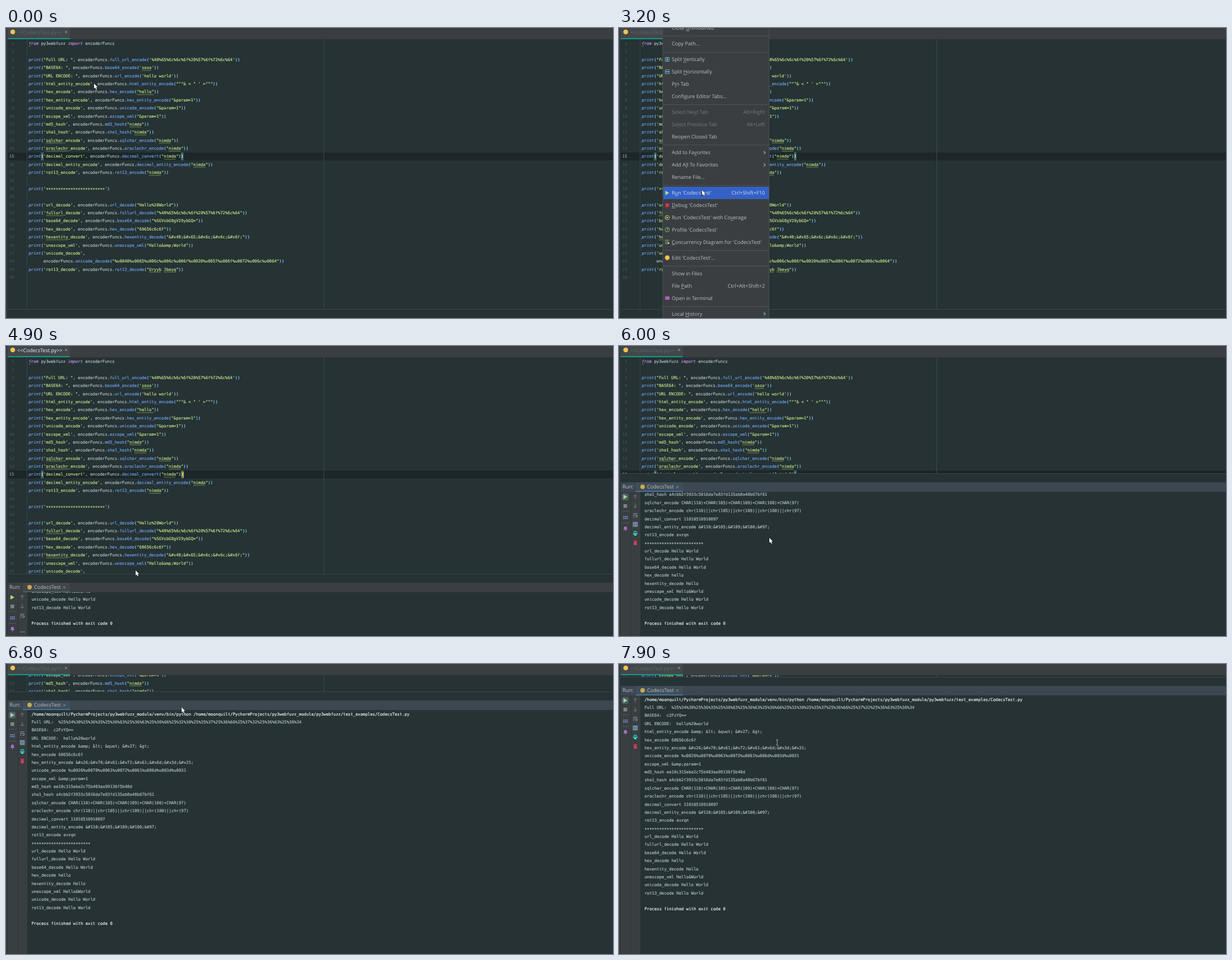
Write an HTML page with a canvas that moves like this. It is 1082x517 px and loops after 8 s.

```html
<!DOCTYPE html>
<html lang="en">
<head>
<meta charset="utf-8">
<title>Codec test run</title>
<style>
html, body { margin: 0; width: 100%; height: 100%; overflow: hidden; background: #263234; }
canvas { display: block; }
</style>
</head>
<body>
<canvas id="stage" width="1082" height="517"></canvas>
<script>
const W = 1082, HT = 517, LOOP = 8000;
const ctx = document.getElementById('stage').getContext('2d');
ctx.textRendering = 'geometricPrecision';

const CW = 4.378, LINE = 14.38, CODE_X = 40.5;
const MONO = '7.27px "DejaVu Sans Mono", monospace';
const UI = '9.1px "Open Sans", "Noto Sans", sans-serif';
const C = {
  bg: '#263234', bar: '#3a3e40', menu: '#3b3e40', rule: '#37474b', logo: '#efc352',
  plain: '#b4c1c8', func: '#6fa4ee', str: '#bfe38a', punct: '#89ddff', key: '#c792ea',
  ui: '#b9c0c4', dim: '#73797c'
};

const CODE = `from py3webfuzz import encoderFuncs

print("Full URL: ", encoderFuncs.full_url_encode('%48%65%6c%6c%6f%20%57%6f%72%6c%64'))
print("BASE64: ", encoderFuncs.base64_encode('sasa'))
print("URL ENCODE: ", encoderFuncs.url_encode('hello world'))
print('html_entity_encode', encoderFuncs.html_entity_encode("""& < " ' >"""))
print('hex_encode', encoderFuncs.hex_encode("hello"))
print('hex_entity_encode', encoderFuncs.hex_entity_encode("&param=1"))
print('unicode_encode', encoderFuncs.unicode_encode("&param=1"))
print('escape_xml', encoderFuncs.escape_xml("&param=1"))
print('md5_hash', encoderFuncs.md5_hash("nimda"))
print('sha1_hash', encoderFuncs.sha1_hash("nimda"))
print('sqlchar_encode', encoderFuncs.sqlchar_encode("nimda"))
print('oraclechr_encode', encoderFuncs.oraclechr_encode("nimda"))
print('decimal_convert', encoderFuncs.decimal_convert("nimda"))
print('decimal_entity_encode', encoderFuncs.decimal_entity_encode("nimda"))
print('rot13_encode', encoderFuncs.rot13_encode("nimda"))

print('************************')

print('url_decode', encoderFuncs.url_decode("Hello%20World"))
print('fullurl_decode', encoderFuncs.fullurl_decode("%48%65%6c%6c%6f%20%57%6f%72%6c%64"))
print('base64_decode', encoderFuncs.base64_decode("%SGVsbG8gV29ybGQ="))
print('hex_decode', encoderFuncs.hex_decode("68656c6c6f"))
print('hexentity_decode', encoderFuncs.hexentity_decode("&#x48;&#x65;&#x6c;&#x6c;&#x6f;"))
print('unescape_xml', encoderFuncs.unescape_xml("Hello&amp;World"))
print('unicode_decode',
      encoderFuncs.unicode_decode("%u0048%u0065%u006c%u006c%u006f%u0020%u0057%u006f%u0072%u006c%u0064"))
print('rot13_decode', encoderFuncs.rot13_decode("Uryyb Jbeyq"))
`.split('\n');

const OUTPUT = `/home/moonquilt/PycharmProjects/py3webfuzz_module/venv/bin/python /home/moonquilt/PycharmProjects/py3webfuzz_module/py3webfuzz/test_examples/CodecsTest.py
Full URL:  %25%34%38%25%36%35%25%36%63%25%36%63%25%36%66%25%32%30%25%35%37%25%36%66%25%37%32%25%36%63%25%36%34
BASE64:  c2FzYQ==
URL ENCODE:  hello%20world
html_entity_encode &amp; &lt; &quot; &#x27; &gt;
hex_encode 68656c6c6f
hex_entity_encode &#x26;&#x70;&#x61;&#x72;&#x61;&#x6d;&#x3d;&#x31;
unicode_encode %u0026%u0070%u0061%u0072%u0061%u006d%u003d%u0031
escape_xml &amp;param=1
md5_hash ee10c315eba2c75b403ea99136f5b48d
sha1_hash a4cbb2f3933c5016da7e83fd135ab8a48b67bf61
sqlchar_encode CHAR(110)+CHAR(105)+CHAR(109)+CHAR(100)+CHAR(97)
oraclechr_encode chr(110)||chr(105)||chr(109)||chr(100)||chr(97)
decimal_convert 11010510910097
decimal_entity_encode &#110;&#105;&#109;&#100;&#97;
rot13_encode avzqn
************************
url_decode Hello World
fullurl_decode Hello World
base64_decode Hello World
hex_decode hello
hexentity_decode Hello
unescape_xml Hello&World
unicode_decode Hello World
rot13_decode Hello World

Process finished with exit code 0`.split('\n');

// y, label ("_" precedes the mnemonic), right side, icon
const MENU = [
  [0, 'Close _Unmodified'], [28, 'Copy Path...'],
  [56, 'Split _Vertically', '', 'cols'], [78, 'Split _Horizontally', '', 'rows'],
  [100, 'P_in Tab'], [122, 'Configure Editor Tabs...'],
  [150, 'Select Ne_xt Tab', 'Alt+Right', 'off'], [172, 'Se_lect Previous Tab', 'Alt+Left', 'off'],
  [194, 'Reopen Closed Tab'],
  [222, 'Add to Fa_vorites', '>'], [244, 'Add A_ll To Favorites', '>'], [266, 'Rename File...'],
  [294, "R_un 'CodecsTest'", 'Ctrl+Shift+F10', 'play'], [316, "_Debug 'CodecsTest'", '', 'bug'],
  [338, "Run 'CodecsTest' with Co_verage", '', 'cover'], [359.5, "Profile 'CodecsTest'", '', 'clock'],
  [381.3, "_Concurrency Diagram for 'CodecsTest'", '', 'list'],
  [409.5, "Edit 'CodecsTest'...", '', 'logo'],
  [437.5, 'Show in Files'], [459.5, 'File _Path', 'Ctrl+Alt+Shift+2'],
  [481.5, 'Open in Terminal', '', 'term'], [509.5, 'Local _History', '>']
];
const RULES = [14, 43, 136, 208, 280, 396, 424, 496];

const MOUSE = [
  [0, 157, 99], [100, 157, 99], [200, 160, 101], [600, 160, 101], [900, 122, 52], [1000, 122, 52],
  [1400, 77, 12], [2300, 77, 12], [2800, 264, 278], [3000, 252, 289], [3100, 252, 289],
  [3200, 148, 289], [3600, 148, 289], [3700, 150, 290], [4600, 150, 290], [4900, 231, 400],
  [5000, 233, 413], [5100, 233, 413], [5500, 240, 428], [5600, 241, 427], [6000, 268, 342],
  [6500, 303, 120], [6800, 313, 77], [7500, 329, 45], [7600, 329, 45], [7900, 282, 140]
];
const HEADER = [[0, 430], [5600, 430], [6000, 251], [6500, 112], [6800, 73], [7400, 45], [7500, 47]];

function track(keys, t, k = 1) {
  let i = 0;
  while (i < keys.length - 1 && keys[i + 1][0] <= t) i++;
  const a = keys[i], b = keys[i + 1];
  return b ? a[k] + (b[k] - a[k]) * (t - a[0]) / (b[0] - a[0]) : a[k];
}
const within = (t, a, b) => t >= a && t < b;

function rect(x, y, w, h, color) {
  ctx.fillStyle = color;
  ctx.fillRect(x, y, w, h);
}
function text(s, x, y, color, font = UI, align = 'left') {
  ctx.font = font;
  ctx.fillStyle = color;
  ctx.textAlign = align;
  ctx.fillText(s, x, y);
}
// Code face: slightly heavier strokes and a centred asterisk.
function mono(s, x, y, color, style = '') {
  const glyphs = s.replaceAll('*', '\u2217');
  text(glyphs, x, y, color, style + MONO);
  ctx.strokeStyle = color;
  ctx.lineWidth = 0.18;
  ctx.strokeText(glyphs, x, y);
}
function dot(x, y, r, color) {
  ctx.fillStyle = color;
  ctx.beginPath();
  ctx.arc(x, y, r, 0, 7);
  ctx.fill();
}
function path(points, color, width = 1) {
  ctx.beginPath();
  points.forEach(([x, y], i) => i ? ctx.lineTo(x, y) : ctx.moveTo(x, y));
  ctx.strokeStyle = color;
  ctx.lineWidth = width;
  ctx.stroke();
}
function shape(points, color) {
  ctx.fillStyle = color;
  ctx.beginPath();
  points.forEach(([x, y]) => ctx.lineTo(x, y));
  ctx.fill();
}
function cross(x, y, r, color) {
  path([[x - r, y - r], [x + r, y + r]], color);
  path([[x + r, y - r], [x - r, y + r]], color);
}
function clipped(x, y, w, h, draw) {
  ctx.save();
  ctx.beginPath();
  ctx.rect(x, y, w, h);
  ctx.clip();
  draw();
  ctx.restore();
}
function squiggle(x, y, w) {
  const pts = [];
  for (let i = 0; i <= w; i += 1.5) pts.push([x + i, y + (pts.length % 2 ? 1.3 : 0)]);
  path(pts, '#9aa653', 0.8);
}

const TOKEN = /"""[^]*"""|'[^']*'|"[^"]*"|\w+(?=\()|\w+\.?|[(),]+/g;
const TYPO = /nimda|sasa|sqlchar|oraclechr|hexentity|fullurl|Uryyb|Jbeyq|"hello"/g;

function codeLine(line, y) {
  for (const m of line.matchAll(TOKEN)) {
    const s = m[0], x = CODE_X + m.index * CW;
    const isKey = s === 'from' || s === 'import';
    let color = C.plain;
    if (/^['"]/.test(s)) color = C.str;
    else if (isKey) color = C.key;
    else if (/^[(),]/.test(s)) color = C.punct;
    else if (line[m.index + s.length] === '(') color = C.func;
    mono(s, x, y, color, isKey || s === 'print' ? 'italic ' : '');
    if (color === C.str)
      for (const typo of s.matchAll(TYPO)) squiggle(x + typo.index * CW, y + 1.7, typo[0].length * CW);
  }
}

function editor(bottom, scroll, caret) {
  clipped(0, 20, W, bottom - 20, () => {
    const top = 222 - scroll;
    rect(3, top, W, 14, '#1d2629');
    rect(37, 20, 1, HT, '#35454a');
    rect(566, 20, 1, HT, '#3a4a4f');
    for (const col of [5, 62]) rect(CODE_X + col * CW, top, 4.4, 14, '#41696b');
    CODE.forEach((line, i) => {
      const y = 30.1 + i * LINE - scroll;
      text(i + 1, 14.5, y, i === 14 ? '#a9b7bd' : '#455a60', MONO, 'right');
      codeLine(line, y);
    });
    squiggle(CODE_X, 31.8 - scroll, CW);
    for (const [col, ch] of [[5, '('], [62, ')']])
      text(ch, CODE_X + col * CW, 30.1 + 14 * LINE - scroll, '#ffeb95', 'bold ' + MONO);
    if (caret) rect(315.4, top + 2, 1.4, 11, '#ffcc00');
  });
  rect(0, bottom, W, 1, C.rule);
}

function tabBar(active, hover) {
  rect(0, 0, W, 20, C.bar);
  rect(3, 0, 111, 20, hover ? '#2d3132' : '#424749');
  rect(3, 18, 111, 2, '#13998a');
  dot(12, 7, 4.3, C.logo);
  text('<<CodecsTest.py>>', 20, 11, active ? '#eef2f3' : '#5a6b71');
  cross(107, 7, 2, '#959b9e');
}

const toolX = 29;
const TOOLS = [
  [18, y => arrow(y, -1)], [34, y => arrow(y, 1)],
  [51, y => {
    path([[25, y - 3], [33, y - 3]], '#8fa5c8');
    path([[25, y], [32, y], [33, y + 1], [32, y + 3], [29, y + 3]], '#8fa5c8');
    path([[25, y + 3], [27, y + 3]], '#8fa5c8');
  }],
  [67, y => {
    rect(24, y - 5, 10, 10, '#4b5d6b');
    path([[26, y - 3], [32, y - 3], [32, y + 3], [26, y + 3], [26, y - 3]], '#9fb8d8');
    path([[toolX, y - 2], [toolX, y + 2]], '#9fb8d8');
  }],
  [83, y => {
    rect(26, y - 4, 6, 2, '#26b5ad');
    rect(25, y - 1, 8, 3, '#26b5ad');
    rect(27, y + 2, 4, 2, '#79d6d0');
  }],
  [100, y => {
    rect(26, y - 4, 6, 1.5, '#e03c62');
    rect(26.5, y - 1.8, 5, 5.8, '#e03c62');
  }]
];
function arrow(y, dir) {
  path([[toolX, y - 3.5], [toolX, y + 3.5]], '#758187');
  path([[26, y + dir], [toolX, y + dir * 3.5], [32, y + dir]], '#758187');
}

function toolbar(h, focused) {
  rect(3, h + 9, 35, HT, '#393e40');
  rect(21, h + 9, 1, HT, '#303638');
  if (focused) {
    ctx.fillStyle = '#4c6070';
    ctx.beginPath();
    ctx.roundRect(5, h + 12, 12, 12, 3);
    ctx.fill();
  }
  shape([[8, h + 14], [15, h + 18], [8, h + 22]], '#a8dc84');
  rect(8, h + 31, 6.5, 6.5, '#7c8285');
  rect(5, h + 43, 13, 1, '#51575a');
  for (const x of [7.5, 10.5, 13.5]) {
    rect(x, h + 52, 2, 2, '#758dd0');
    rect(x, h + 55, 2, 2.5, '#758dd0');
  }
  rect(5, h + 64, 13, 1, '#51575a');
  rect(9, h + 71, 5, 4, '#a96cc8');
  rect(8, h + 75, 7, 1.5, '#a96cc8');
  rect(11, h + 76, 1, 3.5, '#a96cc8');
  const fits = TOOLS.filter(([dy]) => h + dy < 495);
  fits.forEach(([dy, draw]) => draw(h + dy));
  if (fits.length < TOOLS.length)
    for (const x of [26, 29, 32]) rect(x - 0.5, 509, 1.4, 1.4, '#b9c0c4');
}

function runPanel(h, t, focused) {
  rect(0, h - 23, W, HT, C.bg);
  rect(3, h - 8, W, 17, focused ? '#3d4751' : '#3b3f42');
  text('Run:', 6, h + 3.3, C.ui, '9.5px "Open Sans", "Noto Sans", sans-serif');
  rect(30, h - 8, 84, 17, focused ? '#414e59' : '#414648');
  rect(30, h + 7.5, 84, 1.5, focused ? '#4b7fb5' : '#4a6275');
  dot(42, h, 4, '#c9a850');
  text('CodecsTest', 50, h + 3.2, C.ui);
  cross(104, h + 0.5, 2, '#8e9598');
  toolbar(h, focused);
  const lines = t < 4000 ? 0 : t < 4100 ? 1 : OUTPUT.length;
  const first = lines === 1 ? h + 16 : Math.min(h + 16, 121);
  clipped(38, h + 9, W, HT, () => {
    for (let i = 0; i < lines; i++) {
      const strong = i === 0 || i === OUTPUT.length - 1;
      mono(OUTPUT[i], 45.5, first + 2.6 + i * LINE, strong ? '#eef3f5' : '#b2bfc6');
    }
  });
}

const ICONS = {
  cols(y) { for (const x of [82.5, 86.5]) frame(x, y - 3.5, 3, 7); path([[82, y], [90, y]], '#5fa3c0'); },
  rows(y) { for (const d of [-3.5, 0.5]) frame(82.5, y + d, 7, 3); },
  play(y) { shape([[82.5, y - 4], [89.5, y], [82.5, y + 4]], '#a8dc84'); },
  bug(y) { dot(86, y, 3.2, '#e0325c'); cross(86, y, 3.6, '#e0325c'); },
  cover(y) { ring(y, '#b6d96c'); shape([[84.5, y - 2], [88, y], [84.5, y + 2]], '#b6d96c'); },
  clock(y) { ring(y, '#79c47e'); path([[86, y + 1], [86, y - 2], [88, y - 2]], '#79c47e'); },
  list(y) {
    for (const d of [-3, 0, 3]) path([[82, y + d], [88 - d / 2, y + d]], '#8fbf88');
    shape([[87, y], [90.5, y + 2.2], [87, y + 4.4]], '#a8dc84');
  },
  logo(y) { dot(86, y, 4.2, C.logo); },
  term(y) { rect(82, y - 3, 8, 6, '#b565b8'); path([[83.5, y - 1], [85, y], [83.5, y + 1]], '#3b3e40', 0.8); }
};
function frame(x, y, w, h) {
  ctx.strokeStyle = '#5fa3c0';
  ctx.lineWidth = 1;
  ctx.strokeRect(x, y, w, h);
}
function ring(y, color) {
  ctx.beginPath();
  ctx.arc(86, y, 3.8, 0, 7);
  ctx.strokeStyle = color;
  ctx.lineWidth = 1;
  ctx.stroke();
}

function menu(mx, my) {
  rect(78, 0, 190, HT, C.menu);
  rect(77.5, 0, 1, HT, '#4b5053');
  rect(267, 0, 1, HT, '#4b5053');
  for (const y of RULES) rect(79, y, 188, 1, '#4d5153');
  for (const [y, label, right, icon] of MENU) {
    const off = icon === 'off';
    const hot = !off && mx > 78 && mx < 268 && Math.abs(my - y) < 10.9;
    if (hot) rect(79, y - 11, 188, 22, '#3461c6');
    const color = off ? C.dim : hot ? '#d3dcee' : C.ui;
    const cut = label.indexOf('_'), plain = label.replace('_', '');
    text(plain, 94, y + 3.2, color);
    if (cut >= 0) {
      const from = ctx.measureText(plain.slice(0, cut)).width;
      rect(94 + from, y + 4.5, ctx.measureText(plain[cut]).width, 0.8, color);
    }
    if (right === '>') path([[258, y - 2.5], [260.8, y], [258, y + 2.5]], '#6fc3d6', 1.1);
    else if (right) text(right, 260, y + 3.2, color, UI, 'right');
    if (ICONS[icon]) ICONS[icon](y);
  }
}

function pointer(x, y) {
  const p = [[0, 0], [0, 9], [2, 7.2], [3.5, 10.4], [5, 9.7], [3.6, 6.6], [6.4, 6.4], [0, 0]]
    .map(([a, b]) => [x + a, y + b]);
  path(p, '#14191c', 1.4);
  shape(p, '#ffffff');
}
function beam(x, y) {
  for (const [color, w] of [['#1a2124', 1.6], ['#dde3e5', 0.8]]) {
    path([[x, y - 4.5], [x, y + 4.5]], color, w);
    path([[x - 1.6, y - 4.8], [x + 1.6, y - 4.8]], color, w);
    path([[x - 1.6, y + 4.8], [x + 1.6, y + 4.8]], color, w);
  }
}

function draw(t) {
  const mx = track(MOUSE, t, 1), my = track(MOUSE, t, 2);
  const panelOpen = t >= 3800, focused = t >= 5700;
  const h = Math.round(track(HEADER, t));
  const caret = within(t, 1600, 1900) || within(t, 3700, 4400) || within(t, 4900, 5400);
  const scroll = panelOpen ? Math.max(0, Math.min(137.3, 251 - h)) : 0;

  rect(0, 0, W, HT, C.bg);
  if (panelOpen) runPanel(h, t, focused);
  editor(panelOpen ? h - 24 : 501, scroll, caret);
  rect(0, 0, 2, HT, '#3a4042');
  tabBar(within(t, 1600, 2100) || within(t, 3700, 5700), within(t, 1400, 2100));
  if (within(t, 2100, 3700)) menu(mx, my);

  const overText = within(t, 200, 1300) || within(t, 3700, 4800) || t >= 7700;
  (overText ? beam : pointer)(mx, my);
}

const start = performance.now();
function tick() {
  const t = (performance.now() - start) % LOOP;
  draw(Math.floor(t / 100) * 100);
  requestAnimationFrame(tick);
}
tick();
</script>
</body>
</html>
```
